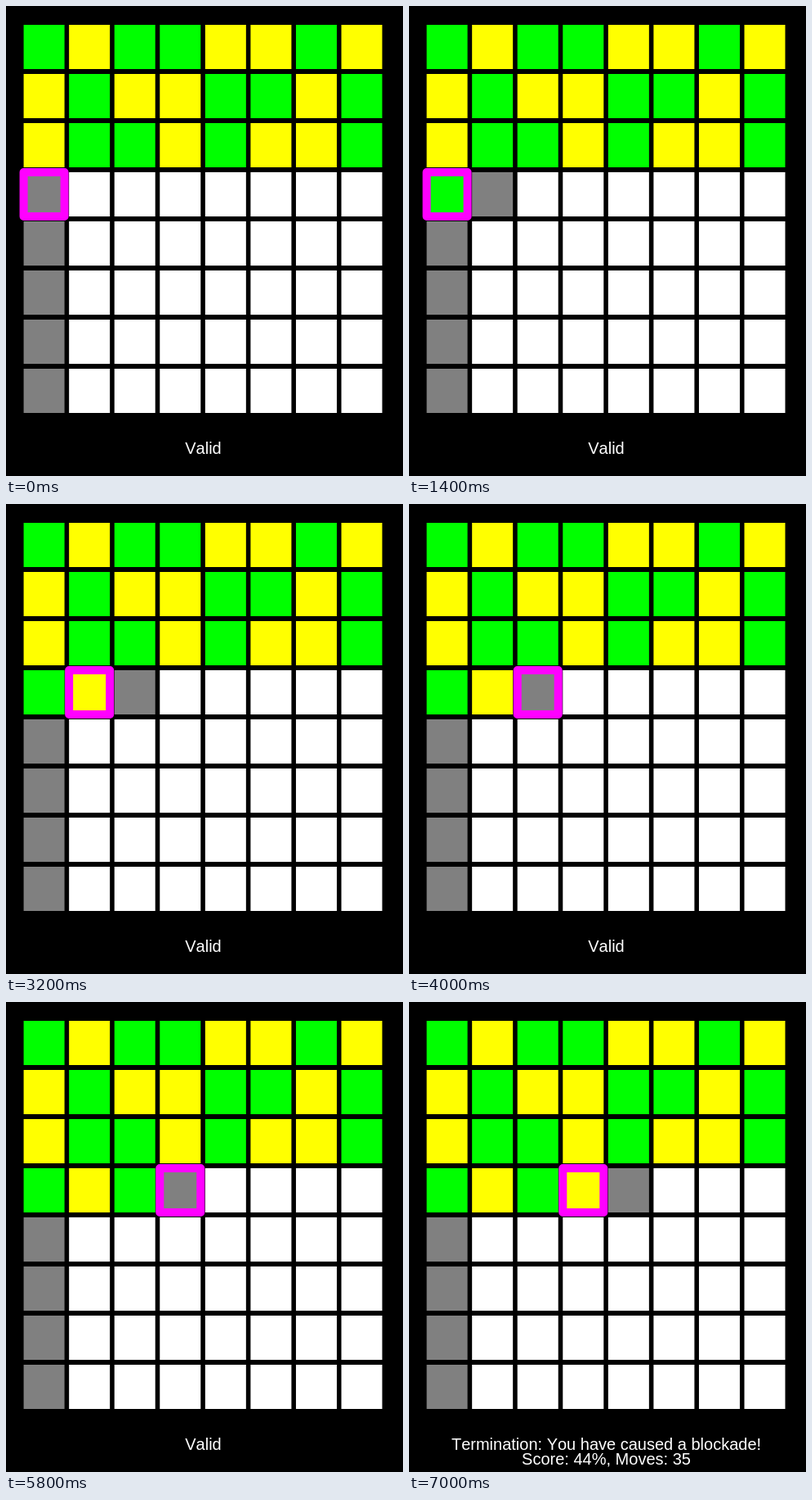
Write an HTML page with a canvas that moves like this. It is 486 by 574 pixels and loops after 9 s.

```html
<!DOCTYPE html>
<html lang="en">
<head>
<meta charset="utf-8">
<title>Grid puzzle</title>
<style>
  html, body { margin: 0; width: 100%; height: 100%; overflow: hidden; background: #000; }
  canvas { display: block; }
</style>
</head>
<body>
<canvas id="stage" width="486" height="574"></canvas>
<script>
const ctx = document.getElementById("stage").getContext("2d");
const LOOP = 9000;
const SIZE = 8, CELL_W = 50, CELL_H = 54;
const COLORS = { G: "#00ff00", Y: "#ffff00", open: "#808080", empty: "#ffffff" };
const GIVEN = ["GYGGYYGY", "YGYYGGYG", "YGGYGYYG"];
const PLAYED = "GYGY";
const PLAY_ROW = GIVEN.length;
const FILL_TIMES = [1400, 3200, 5000, 7000];
const MOVE_TIMES = [2000, 4000, 5800];

const cellX = col => 21.6 + col * 55.56;
const cellY = row => 23 + row * 60;
const countPassed = (times, t) => times.filter(time => t >= time).length;

function cellColor(row, col, filled) {
  if (row < PLAY_ROW) return COLORS[GIVEN[row][col]];
  if (row === PLAY_ROW && col < filled) return COLORS[PLAYED[col]];
  const nextFree = row === PLAY_ROW ? filled : 0;
  return col === nextFree ? COLORS.open : COLORS.empty;
}

function drawText(lines) {
  ctx.font = "20px 'Liberation Sans', Arial, sans-serif";
  ctx.fontKerning = "none";
  ctx.textAlign = "center";
  ctx.fillStyle = "#fff";
  lines.forEach((line, i) => ctx.fillText(line, 241.5, 547 + i * 18));
}

function draw(t) {
  const filled = countPassed(FILL_TIMES, t);
  const cursor = countPassed(MOVE_TIMES, t);

  ctx.fillStyle = "#000";
  ctx.fillRect(0, 0, 486, 574);
  for (let row = 0; row < SIZE; row++) {
    for (let col = 0; col < SIZE; col++) {
      ctx.fillStyle = cellColor(row, col, filled);
      ctx.fillRect(cellX(col), cellY(row), CELL_W, CELL_H);
    }
  }

  ctx.strokeStyle = "#ff00ff";
  ctx.lineWidth = 10;
  ctx.lineJoin = "round";
  ctx.strokeRect(cellX(cursor), cellY(PLAY_ROW), CELL_W, CELL_H);

  drawText(filled === PLAYED.length
    ? ["Termination: You have caused a blockade!", "Score: 44%, Moves: 35"]
    : ["Valid"]);
}

const start = performance.now();
function tick() {
  draw((performance.now() - start) % LOOP);
  requestAnimationFrame(tick);
}
tick();
</script>
</body>
</html>
```
